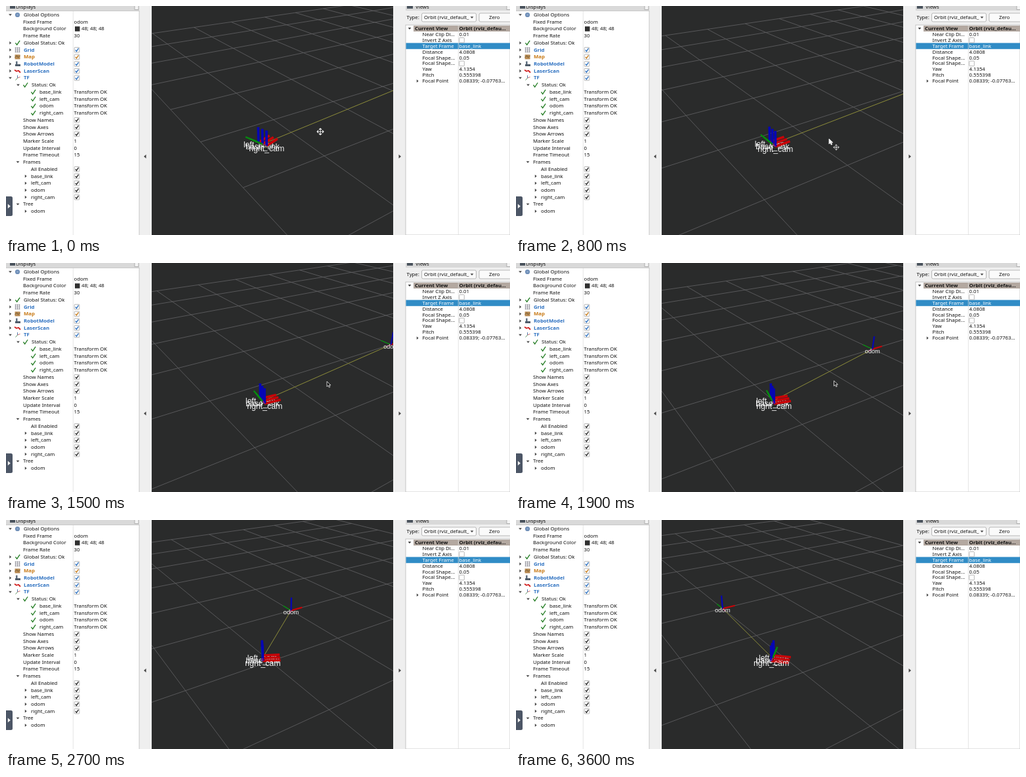
These frames come from a looping animation (768 by 350 pixels, 3.7 s). An HTML page:

```html
<!DOCTYPE html>
<html lang="en">
<head>
<meta charset="utf-8">
<title>Robot frames view</title>
<style>
  html, body { margin: 0; width: 100%; height: 100%; overflow: hidden; background: #efefef; }
  svg { display: block; }
  text { font: 7.75px "Noto Sans", "Open Sans", sans-serif; fill: #111; white-space: pre; }
  .bold { font-weight: 700; }
  .tag { font-family: "Liberation Sans", Arial, sans-serif; fill: #f2f2f2; text-anchor: middle; }
</style>
</head>
<body>
<svg id="stage" width="768" height="350" viewBox="0 0 768 350">
  <g id="panels"></g>
  <svg x="222" y="0" width="368" height="350" viewBox="222 0 368 350">
    <rect x="222" width="368" height="350" fill="#2a2b2b"/>
    <path id="grid" fill="none" stroke="#606062" stroke-width=".85"/>
    <g id="scene"></g>
    <g id="move">
      <path d="M-5.5 0H5.5M0-5.5V5.5" stroke="#111" stroke-width="3"/>
      <path d="M-5 0H5M0-5V5M-3-2-5 0-3 2M3-2 5 0 3 2M-2-3 0-5 2-3M-2 3 0 5 2 3" fill="none" stroke="#f4f4f4" stroke-width="1.1"/>
    </g>
    <path id="pointer" d="M0 0V8L1.9 6.2 3.3 9.2 4.7 8.5 3.3 5.7H5.9Z" stroke="#f4f4f4" stroke-width=".8"/>
  </svg>
</svg>
<script>
const el = id => document.getElementById(id);

// ---- static panels ----
const rect = (x, y, w, h, fill, extra = '') =>
  `<rect x="${x}" y="${y}" width="${w}" height="${h}" fill="${fill}" ${extra}/>`;
const text = (x, y, s, extra = '') => `<text x="${x}" y="${y + 2.5}" ${extra}>${s}</text>`;
const stroke = (d, color, w = 1) =>
  `<path d="${d}" fill="none" stroke="${color}" stroke-width="${w}"/>`;
const twist = (x, y, open) => open
  ? `<path d="M${x - 2.4} ${y - 1.3}h4.8l-2.4 2.8z" fill="#444"/>`
  : `<path d="M${x - 1.2} ${y - 2.4}v4.8l2.8-2.4z" fill="#444"/>`;
const tick = (x, y, color, s = 1) =>
  stroke(`M${x - 2.7 * s} ${y}l${2 * s} ${2.7 * s} ${3.8 * s}-${5.7 * s}`, color, 1.3);
const box = (x, y, color) =>
  rect(x - 3.8, y - 3.8, 7.6, 7.6, '#fff', 'rx=".8" stroke="#a5a5a5" stroke-width=".8"') +
  (color ? tick(x, y, color, .8) : '');

const BLUE = '#2a6fc0', ORANGE = '#c87a16', GREEN = '#1f7a1f', DARK = '#222';
const icons = {
  ok: (x, y) => tick(x, y, GREEN, 1.15),
  globe: (x, y) => `<circle cx="${x}" cy="${y}" r="3.6" fill="#6f8fb8"/>` +
    `<circle cx="${x}" cy="${y}" r="1.4" fill="#8fa9cb"/>`,
  grid: (x, y) => stroke([-3, 0, 3].map(d =>
    `M${x - 4} ${y + d}h8M${x + d} ${y - 4}v8`).join(''), '#8a8a94', .8),
  map: (x, y) => rect(x - 4, y - 3.5, 8, 7, '#b98a52') + stroke(`M${x - 4} ${y + 1}l3-3 2 3 3-3`, '#6c5a35'),
  robot: (x, y) => rect(x - 3.5, y + .5, 8, 3, '#4d5a68') + rect(x - 2.5, y - 4, 2.5, 4.5, '#5f6f80'),
  scan: (x, y) => stroke(`M${x - 4.5} ${y - 1.5}l3 2 3-1 3 3`, '#d02020', 1.8),
  tf: (x, y) => stroke(`M${x} ${y}l4-1.5`, '#c66', 1) +
    stroke(`M${x} ${y}v-4`, '#57a', 1) + stroke(`M${x} ${y}l-3 3.5`, '#696', 1)
};

// label, text x, twist ('v' open, '>' closed), value (true = checkbox), icon, colour
const displayRows = [
  ['Global Options', 27, 'v', '', 'globe'],
  ['Fixed Frame', 26, '', 'odom'],
  ['Background Color', 26, '', '48; 48; 48'],
  ['Frame Rate', 26, '', '30'],
  ['Global Status: Ok', 27, '>', '', 'ok'],
  ['Grid', 27, '>', true, 'grid', BLUE],
  ['Map', 27, '>', true, 'map', ORANGE],
  ['RobotModel', 27, '>', true, 'robot', BLUE],
  ['LaserScan', 27, '>', true, 'scan', BLUE],
  ['TF', 27, 'v', true, 'tf', BLUE],
  ['Status: Ok', 39, 'v', '', 'ok'],
  ...['base_link', 'left_cam', 'odom', 'right_cam'].map(n => [n, 51, '', 'Transform OK', 'ok']),
  ['Show Names', 26, '', true],
  ['Show Axes', 26, '', true],
  ['Show Arrows', 26, '', true],
  ['Marker Scale', 26, '', '1'],
  ['Update Interval', 26, '', '0'],
  ['Frame Timeout', 26, '', '15'],
  ['Frames', 26, 'v', ''],
  ['All Enabled', 38, '', true],
  ...['base_link', 'left_cam', 'odom', 'right_cam'].map(n => [n, 38, '>', true]),
  ['Tree', 26, 'v', ''],
  ['odom', 38, '>', '']
];

function displaysPanel() {
  let out = rect(0, 0, 203, 7, '#d9d9d9') + text(15, 1.2, 'Displays') +
    rect(6, -3, 8, 7, '#4b545e') + rect(196, -2, 6, 7.5, '#f4f4f4', 'stroke="#999" stroke-width=".7"') +
    rect(0, 7.5, 203, 342.5, '#fff') +
    stroke('M102.3 8V350', '#dedede', .8) + stroke('M203 7V350', '#b9b9b9', .8) + stroke('M0 7.5H203', '#bdbdbd', .8);
  displayRows.forEach(([label, x, arrow, value, icon, color], i) => {
    const y = 13.5 + i * 10.72;
    out += text(x, y, label, color ? `class="bold" style="fill:${color}"` : '');
    if (icon) out += icons[icon](x - 9.5, y);
    if (arrow) out += twist(icon ? x - 20.5 : x - 8, y, arrow === 'v');
    if (value === true) out += box(108, y, color || DARK);
    else if (label === 'Background Color')
      out += rect(105, y - 3.7, 7.5, 7.5, '#303030') + text(115, y, value);
    else out += text(103.6, y, value);
  });
  return out + rect(-3, 291, 13, 30, '#4c5666', 'rx="2.5"') + '<path d="M2.8 302.5v7l4-3.5z" fill="#f5f5f5"/>';
}

const viewRows = [
  ['Current View', 'Orbit (rviz_defau...'],
  ['Near Clip Di...', '0.01'],
  ['Invert Z Axis', false],
  ['Target Frame', 'base_link'],
  ['Distance', '4.0808'],
  ['Focal Shape...', '0.05'],
  ['Focal Shape...', false],
  ['Yaw', '4.1354'],
  ['Pitch', '0.555398'],
  ['Focal Point', '0.08339; -0.07763...']
];

function viewsPanel() {
  const frame = 'rx="2" stroke="#a9a9a9" stroke-width=".8"';
  let out = rect(609, 0, 159, 7, '#d9d9d9') + rect(611, -3, 9, 7, '#4b545e') + text(624, 1.2, 'Views') +
    rect(763, -2, 6, 7.5, '#f4f4f4', 'stroke="#999" stroke-width=".7"') +
    text(610.5, 17.5, 'Type:') +
    rect(633.5, 11, 83, 13, '#fafafa', frame) + text(637, 17.5, 'Orbit (rviz_default_') + twist(710, 17.5, true) +
    rect(721, 11, 50, 13, '#fafafa', frame) + text(736, 17.5, 'Zero') +
    rect(609, 29, 159, 321, '#fff', 'stroke="#b9b9b9" stroke-width=".8"') +
    rect(621, 30, 147, 9, '#b3a8a0') + rect(609.5, 56.5, 159, 9.3, '#308cc6') +
    stroke('M689.3 30V350', '#dedede', .8);
  viewRows.forEach(([label, value], i) => {
    const y = 34.4 + i * 8.92;
    const style = i === 0 ? 'class="bold"' : i === 3 ? 'style="fill:#fff"' : '';
    out += text(i ? 634.5 : 623, y, label, style);
    out += value === false ? box(694.5, y) : text(690.5, y, value, style);
  });
  return out + twist(615, 34.4, true) + twist(627, 114.7, false);
}

el('panels').innerHTML = rect(0, 0, 768, 350, '#efefef') + displaysPanel() + viewsPanel() +
  '<path d="M213.5 227v6l-3.5-3z" fill="#444"/><path d="M598.5 227v6l3.5-3z" fill="#444"/>';

// ---- orbit camera that follows the robot's position ----
const CAM = { yaw: 4.1354, pitch: 0.555398, dist: 4.0808, fx: 0.08339, fy: -0.07763, f: 550, cx: 406, cy: 212.5 };
const [ca, sa] = [-Math.cos(CAM.yaw), -Math.sin(CAM.yaw)];
const [cp, sp] = [Math.cos(CAM.pitch), Math.sin(CAM.pitch)];

// x, y, z are relative to the robot's position, along the fixed frame's axes
function project([x, y, z = 0]) {
  const px = x - CAM.fx, py = y - CAM.fy;
  const right = px * sa - py * ca, ahead = px * ca + py * sa;
  const depth = CAM.dist + ahead * cp - z * sp;
  return { x: CAM.cx + CAM.f * right / depth, y: CAM.cy - CAM.f * (ahead * sp + z * cp) / depth, depth };
}
const depthOf = p => project(p).depth;
const xy = p => `${p.x.toFixed(2)} ${p.y.toFixed(2)}`;

function segment(a, b) {
  const near = 0.4, da = depthOf(a), db = depthOf(b);
  if (da < near && db < near) return '';
  const cut = a.map((v, i) => v + (b[i] - v) * (near - da) / (db - da));
  if (da < near) a = cut;
  if (db < near) b = cut;
  return `M${xy(project(a))}L${xy(project(b))}`;
}

// time, robot x, robot y, heading
const route = [
  [0, -4.43, -0.43, 0.32], [800, -3.43, -0.22, 0.02], [1500, -2.5, -0.33, -0.14],
  [1900, -2.015, -0.445, -0.27], [2300, -1.504, -0.637, -0.4],
  [3000, -0.705, -1.104, -0.58], [3600, -0.117, -1.575, -0.78]
];
const pointerRoute = [[0, 478, 182], [800, 477, 203], [1500, 489, 181], [1900, 484.5, 180], [2500, 484.5, 180]];

function along(keys, t, smooth) {
  let i = keys.findIndex(k => k[0] >= t) - 1;
  if (i === -2) i = keys.length - 2;
  i = Math.max(0, i);
  const a = keys[i], b = keys[i + 1], span = b[0] - a[0], u = Math.min(1, (t - a[0]) / span);
  const p = keys[i - 1] || a, n = keys[i + 2] || b;
  return a.slice(1).map((v, j) => {
    const k = j + 1, d = b[k] - v;
    if (!smooth) return v + d * u;
    const m0 = (b[k] - p[k]) / (b[0] - p[0]) * span, m1 = (n[k] - v) / (n[0] - a[0]) * span;
    return v + u * m0 + u * u * (3 * d - 2 * m0 - m1) + u * u * u * (m0 + m1 - 2 * d);
  });
}

function axes([x, y], heading) {
  const c = 0.2 * Math.cos(heading), s = 0.2 * Math.sin(heading);
  const depth = depthOf([x, y]);
  const w = 62 / (depth * depth);
  return stroke(segment([x, y, 0], [x - s, y + c, 0]), '#078a10', w * .65) +
    stroke(segment([x, y, 0], [x + c, y + s, 0]), '#c80408', w) +
    stroke(segment([x, y, 0], [x, y, 0.2]), '#0606b4', w);
}

function tag(p, name) {
  const o = project(p);
  return `<text class="tag" x="${o.x}" y="${o.y + 32 / o.depth}" style="font-size:${50 / o.depth}px">${name}</text>`;
}

function draw(t) {
  const [rx, ry, heading] = along(route, t, true);
  let lines = '';
  for (let i = -5; i <= 5; i++) {
    lines += segment([i - rx, -5 - ry, 0], [i - rx, 5 - ry, 0]);
    lines += segment([-5 - rx, i - ry, 0], [5 - rx, i - ry, 0]);
  }
  el('grid').setAttribute('d', lines);

  const odom = [-rx, -ry, 0], base = [0, 0, 0];
  const side = d => [-d * Math.sin(heading), d * Math.cos(heading), 0];
  const left = side(0.06), right = side(-0.06);
  const reach = Math.hypot(rx, ry);
  const neck = odom.map(v => v * (1 - 0.1 / reach));
  el('scene').innerHTML =
    axes(odom, 0) +
    stroke(segment(base, neck), '#8c8c3a', 1) +
    stroke(segment(neck, odom), '#a8205e', 1.5) +
    tag(odom, 'odom') + tag(left, 'left_cam') + tag(base, 'base_link') +
    axes(left, heading) + axes(base, heading) + axes(right, heading) +
    stroke(segment(right, base), '#a01478', 1.6) +
    tag(right, 'right_cam');

  const [mx, my] = along(pointerRoute, t, false);
  const dragging = t < 400, released = t >= 1100;
  const show = (id, on, x, y, size = 1) => {
    el(id).setAttribute('visibility', on ? 'visible' : 'hidden');
    el(id).setAttribute('transform', `translate(${x} ${y}) scale(${size})`);
  };
  el('pointer').setAttribute('fill', released ? '#111' : '#f4f4f4');
  show('pointer', !dragging && t < 2500, mx, my);
  show('move', !released, dragging ? mx + 1 : mx + 11, dragging ? my + 10 : my + 13, dragging ? 1 : .85);
}

const LOOP = 3700, STEP = 100;
let start, shown = -1;
function tickFrame(now) {
  start ??= now;
  const t = Math.floor((now - start) % LOOP / STEP) * STEP;
  if (t !== shown) draw(shown = t);
  requestAnimationFrame(tickFrame);
}
draw(0);
requestAnimationFrame(tickFrame);
</script>
</body>
</html>
```
